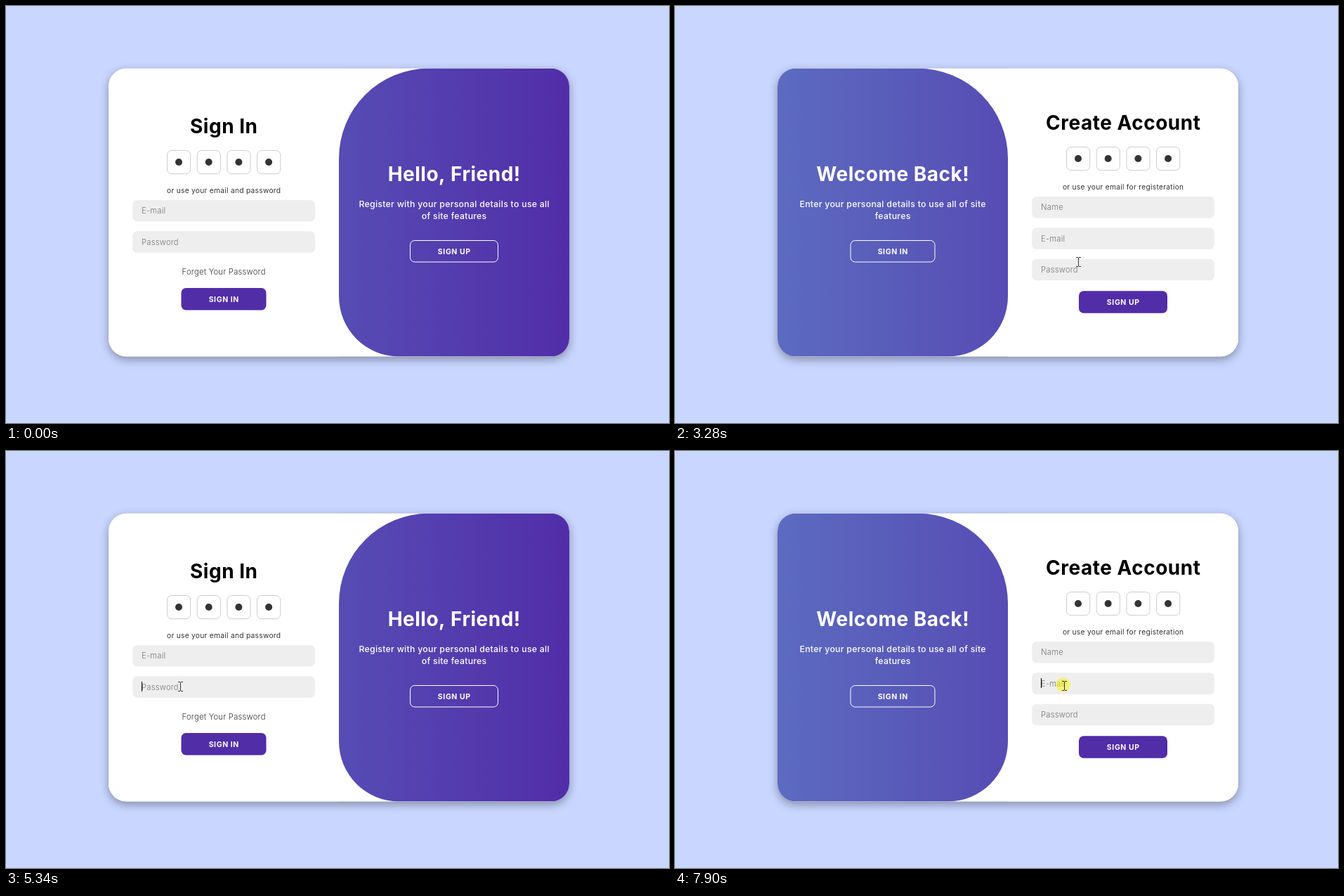
Write an HTML page with a canvas that moves like this. It is 944x593 px and loops after 8000 ms.

```html
<!DOCTYPE html>
<html lang="en">
<head>
<meta charset="utf-8">
<title>Sliding sign-in card</title>
<style>
  html, body { margin: 0; width: 100%; height: 100%; overflow: hidden; background: #c9d6ff; }
  canvas { display: block; }
</style>
</head>
<body>
<canvas id="stage" width="944" height="593"></canvas>
<script>
const LOOP = 8000, STEP = 68.95, FIRST_MOVE = 530;
const SLIDE_MS = 600, RELEASE_MS = 46, GLOW_MS = 130, BLINK_MS = 530;
const CARD = { x: 146, y: 88.7, w: 656, h: 409.7, r: 25.6 };
const HALF = CARD.w / 2, MID = HALF / 2;
const BUTTON_H = 31.5, FIELD_H = 30.6, FIELD_X = 34.2, FIELD_GAP = 44.4;
const PURPLE = '#512da8', INK = '#333';

const stage = document.getElementById('stage');
const ctx = stage.getContext('2d');
const layer = document.createElement('canvas');
layer.width = stage.width;
layer.height = stage.height;
const layerCtx = layer.getContext('2d');

const STYLES = {
  title: { weight: 700, size: 28, gap: 0.5 },
  note: { weight: 400, size: 10.25, gap: 0.26 },
  field: { weight: 300, size: 11.2, gap: 0.25 },
  body: { weight: 500, size: 12.3, gap: 0.28 },
  button: { weight: 700, size: 10.5, gap: 0.6 },
};

const SIGN_IN = {
  title: 'Sign In', top: 181,
  note: 'or use your email and password',
  fields: ['E-mail', 'Password'],
  link: 'Forget Your Password',
  button: { text: 'SIGN IN', y: 401, w: 121 },
};
const SIGN_UP = {
  title: 'Create Account', top: 176,
  note: 'or use your email for registeration',
  fields: ['Name', 'E-mail', 'Password'],
  button: { text: 'SIGN UP', y: 405.3, w: 126 },
};
const WELCOME = {
  title: 'Welcome Back!',
  lines: ['Enter your personal details to use all of site', 'features'],
  button: { text: 'SIGN IN', y: 333, w: 121 },
};
const HELLO = {
  title: 'Hello, Friend!',
  lines: ['Register with your personal details to use all', 'of site features'],
  button: { text: 'SIGN UP', y: 333, w: 126 },
};

// Pointer stops. A press focuses the given field, or else slides the card.
const STOPS = [
  { at: FIRST_MOVE, x: 679, y: 582 },
  { at: 670, leave: 810, x: 541, y: 557 },
  { at: 1220, x: 359, y: 425 },
  { at: 1640, x: 652, y: 360 },
  { at: 2060, leave: 2360, x: 620, y: 346, press: 2322 },
  { at: 2730, leave: 3110, x: 604, y: 366 },
  { at: 3650, leave: 3920, x: 319, y: 345, press: 3662 },
  { at: 4500, leave: 4780, x: 259, y: 294, press: 4640, field: 0 },
  { at: 5140, leave: 5690, x: 248, y: 335, press: 5150, field: 1 },
  { at: 6150, x: 632, y: 341 },
  { at: 6340, leave: 6890, x: 600, y: 336, press: 6510 },
  { at: 7150, leave: 7310, x: 556, y: 287, press: 7170, field: 0 },
  { at: 7800, x: 553.5, y: 333.5, press: 7820, field: 1 },
];

const snap = t => FIRST_MOVE + Math.floor((t - FIRST_MOVE) / STEP) * STEP;

const pressesBy = t => STOPS.filter(s => s.press <= t);
const slidesBy = t => pressesBy(t).filter(s => s.field === undefined);

const bezier = (a, b, s) => 3 * a * s * (1 - s) ** 2 + 3 * b * s * s * (1 - s) + s ** 3;
const smooth = u => u * u * (3 - 2 * u);

// cubic-bezier(.42, 0, .58, 1)
function easeInOut(u) {
  let lo = 0, hi = 1;
  for (let i = 0; i < 24; i++) {
    const s = (lo + hi) / 2;
    if (bezier(0.42, 0.58, s) < u) lo = s; else hi = s;
  }
  return bezier(0, 1, lo);
}

// p: how far the card has slid; upAlpha: opacity of the sign-up form
function slideAt(t) {
  const slides = slidesBy(t - RELEASE_MS);
  if (!slides.length) return { p: 0, upAlpha: 0 };
  const start = slides[slides.length - 1].press + RELEASE_MS;
  const u = Math.min(1, (t - start) / SLIDE_MS);
  const e = u < 1 ? easeInOut(u) : 1;
  if (slides.length % 2) return { p: e, upAlpha: u >= 0.5 ? 1 : 0 };
  return { p: 1 - e, upAlpha: e <= 0.625 ? 1 - e : 0 };
}

function focusAt(t) {
  const last = pressesBy(t).pop();
  if (!last || last.field === undefined) return null;
  const lit = (t - last.press) % (2 * BLINK_MS) < BLINK_MS;
  return lit ? { form: slidesBy(t).length % 2 ? SIGN_UP : SIGN_IN, field: last.field } : null;
}

function pointerAt(t) {
  if (t < FIRST_MOVE) return null;
  const i = STOPS.findIndex(s => s.at > t);
  if (i < 0) return STOPS[STOPS.length - 1];
  const a = STOPS[i - 1], b = STOPS[i], leave = a.leave || a.at;
  const e = smooth(Math.max(0, (t - leave) / (b.at - leave)));
  return { x: a.x + (b.x - a.x) * e, y: a.y + (b.y - a.y) * e };
}

const fieldTop = (form, i) => form.top + 94.9 + i * FIELD_GAP;

function box(c, x, y, w, h, r) {
  c.beginPath();
  c.roundRect(x, y, w, h, r);
}

function fillBox(c, color, ...rect) {
  box(c, ...rect);
  c.fillStyle = color;
  c.fill();
}

function strokeBox(c, color, ...rect) {
  box(c, ...rect);
  c.strokeStyle = color;
  c.lineWidth = 1;
  c.stroke();
}

function dot(c, color, x, y, r) {
  c.beginPath();
  c.arc(x, y, r, 0, Math.PI * 2);
  c.fillStyle = color;
  c.fill();
}

function label(c, text, x, y, style, color, align = 'center') {
  const { weight, size, gap } = STYLES[style];
  c.font = `${weight} ${size}px Inter, "Open Sans", sans-serif`;
  c.letterSpacing = gap + 'px';
  c.textAlign = align;
  c.fillStyle = color;
  c.fillText(text, align === 'center' ? x + gap / 2 : x, y);
}

function drawButton(c, { text, y, w }, outlined) {
  const x = MID - w / 2;
  if (outlined) strokeBox(c, '#fff', x + 0.5, y + 0.5, w - 1, BUTTON_H - 1, 6.4);
  else fillBox(c, PURPLE, x, y, w, BUTTON_H, 6.8);
  label(c, text, MID, y + 19.6, 'button', '#fff');
}

function drawForm(c, form, left, focus) {
  c.save();
  c.translate(left, 0);
  c.fillStyle = '#fff';
  c.fillRect(0, CARD.y, HALF, CARD.h);
  label(c, form.title, MID, form.top, 'title', '#000');

  for (let i = 0; i < 4; i++) {
    const x = MID - 81 + i * 42.7, y = form.top + 24;
    strokeBox(c, '#ccc', x + 0.5, y + 0.5, 33.2, 33.2, 6.5);
    dot(c, INK, x + 17, y + 17, 5);
  }
  label(c, form.note, MID, form.top + 85.3, 'note', INK);

  form.fields.forEach((hint, i) => {
    const y = fieldTop(form, i);
    fillBox(c, '#eee', FIELD_X, y, 259.8, FIELD_H, 6.8);
    label(c, hint, 47, y + 19.4, 'field', '#757575', 'left');
    if (focus && focus.form === form && focus.field === i) {
      c.fillStyle = '#000';
      c.fillRect(47, Math.round(y + 8), 1, 14);
    }
  });

  if (form.link) label(c, form.link, MID, 381.5, 'field', INK);
  drawButton(c, form.button, false);
  c.restore();
}

function drawPanel(panel, left) {
  ctx.save();
  ctx.translate(left, 0);
  label(ctx, panel.title, MID, 249, 'title', '#fff');
  panel.lines.forEach((line, i) => label(ctx, line, MID, 286 + i * 17, 'body', '#fff'));
  drawButton(ctx, panel.button, true);
  ctx.restore();
}

// The left edges of everything that slides
const edges = p => ({
  form: CARD.x + HALF * p,
  toggle: CARD.x + HALF * (1 - p),
  welcome: CARD.x - CARD.w * (1 - p),
  hello: CARD.x + HALF + CARD.w * p,
});

function drawToggle(p, edge) {
  const q = 1 - p;
  const fill = ctx.createLinearGradient(CARD.x, 0, CARD.x + CARD.w, 0);
  fill.addColorStop(0, '#5c6bc0');
  fill.addColorStop(1, PURPLE);
  ctx.save();
  fillBox(ctx, fill, edge.toggle, CARD.y, HALF, CARD.h, [128 * q, 128 * p, 85.4 * p, 85.4 * q]);
  ctx.clip();
  drawPanel(WELCOME, edge.welcome);
  drawPanel(HELLO, edge.hello);
  ctx.restore();
}

function pointerKind({ x, y }, edge, upAlpha) {
  const within = (left, top, w, h) => x >= left && x <= left + w && y >= top && y <= top + h;
  const over = (b, left) => within(left + MID - b.w / 2, b.y, b.w, BUTTON_H);
  if (within(edge.toggle, CARD.y, HALF, CARD.h)) {
    return over(WELCOME.button, edge.welcome) || over(HELLO.button, edge.hello) ? 'hand' : 'arrow';
  }
  const form = upAlpha > 0 ? SIGN_UP : SIGN_IN;
  const inField = (_, i) => within(edge.form + FIELD_X, fieldTop(form, i), 259.8, FIELD_H);
  if (form.fields.some(inField)) return 'text';
  return over(form.button, edge.form) ? 'hand' : 'arrow';
}

const POINTERS = {
  arrow: new Path2D('M0 0V14.5L3.6 11.3 6 16.8 8.4 15.7 6 10.5H10Z'),
  hand: new Path2D('M-1.5 2C-1.5-.6 2-.6 2 2V7L8.5 8.4Q10.4 9 10.2 11L8.8 19H1.4L-4.6 12.4Q-5.2 9.6-1.5 11.5Z'),
};

function drawPointer(kind, { x, y }) {
  ctx.save();
  if (kind === 'text') {
    ctx.translate(Math.round(x), Math.round(y));
    ctx.fillStyle = INK;
    ctx.fillRect(0, -6, 1, 12);
    for (const end of [-7, 6]) {
      ctx.fillRect(-3, end, 3, 1);
      ctx.fillRect(1, end, 3, 1);
    }
  } else {
    ctx.translate(x, y);
    ctx.lineJoin = 'round';
    ctx.lineWidth = 1;
    ctx.fillStyle = '#fff';
    ctx.strokeStyle = '#000';
    ctx.fill(POINTERS[kind]);
    ctx.stroke(POINTERS[kind]);
  }
  ctx.restore();
}

function drawCard(t, p, upAlpha, edge) {
  const shape = [CARD.x, CARD.y, CARD.w, CARD.h, CARD.r];
  ctx.save();
  ctx.shadowColor = 'rgba(0,0,0,.35)';
  ctx.shadowBlur = 12.8;
  ctx.shadowOffsetY = 4.3;
  fillBox(ctx, '#fff', ...shape);
  ctx.restore();

  ctx.save();
  box(ctx, ...shape);
  ctx.clip();
  const focus = focusAt(t);
  drawForm(ctx, SIGN_IN, edge.form, focus);
  if (upAlpha > 0) {
    layerCtx.clearRect(0, 0, layer.width, layer.height);
    drawForm(layerCtx, SIGN_UP, edge.form, focus);
    ctx.globalAlpha = upAlpha;
    ctx.drawImage(layer, 0, 0);
    ctx.globalAlpha = 1;
  }
  drawToggle(p, edge);
  ctx.restore();
}

function draw(t) {
  const { p, upAlpha } = slideAt(t);
  const edge = edges(p);
  ctx.fillStyle = '#c9d6ff';
  ctx.fillRect(0, 0, stage.width, stage.height);
  drawCard(t, p, upAlpha, edge);

  const spot = pointerAt(t);
  if (!spot) return;
  if (STOPS.some(s => t >= s.press && t < s.press + GLOW_MS)) {
    dot(ctx, 'rgba(250,244,20,.55)', spot.x - 1, spot.y - 1, 10.3);
  }
  drawPointer(pointerKind(spot, edge, upAlpha), spot);
}

function tick() {
  draw(snap(performance.now() % LOOP));
  requestAnimationFrame(tick);
}
tick();
</script>
</body>
</html>
```
